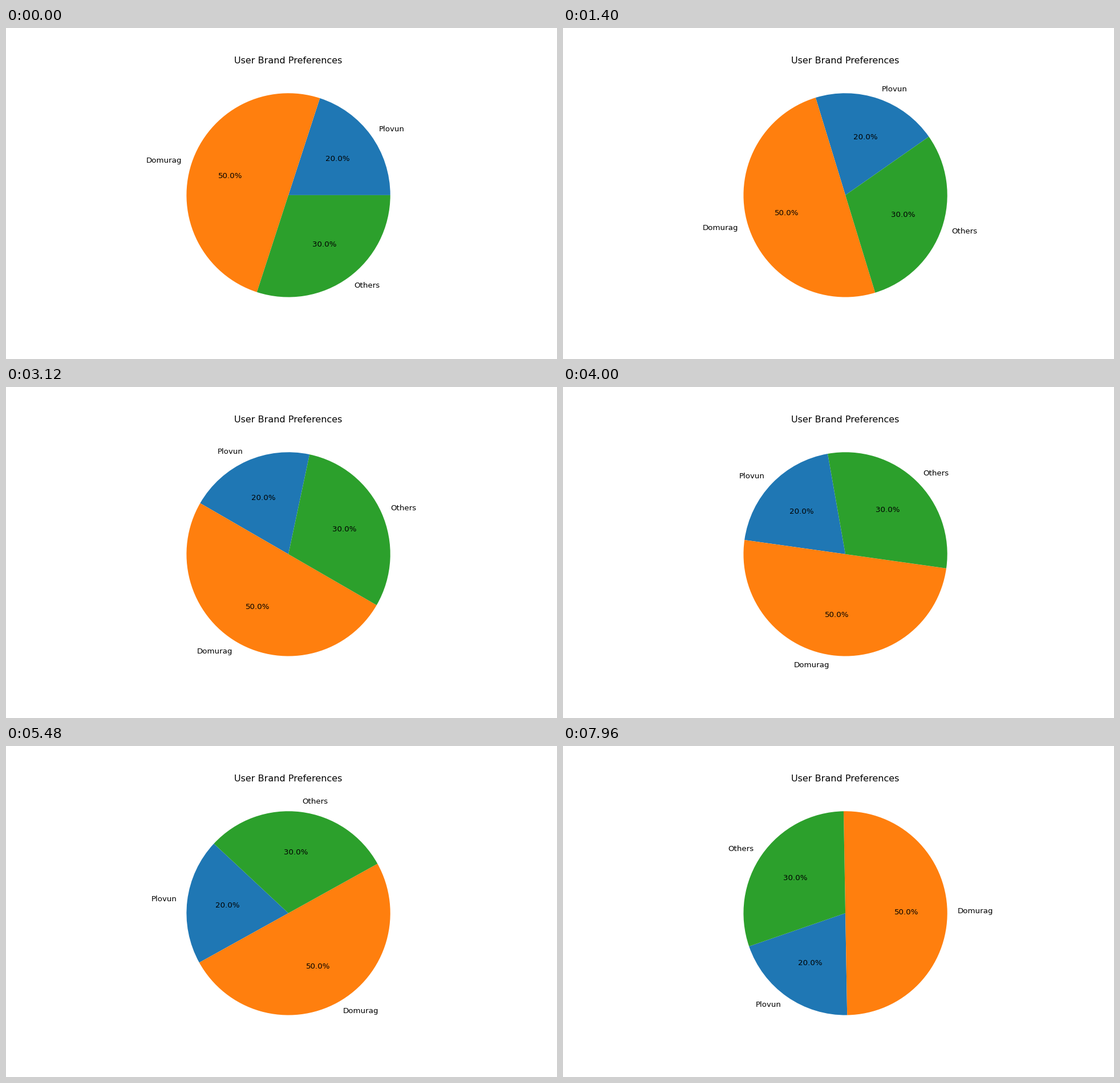
Recreate the animation shown at these times as a matplotlib script. Size 966 px wide and 580 px high, loop 8 s.

```python
import matplotlib.pyplot as plt
from matplotlib.animation import FuncAnimation

WIDTH, HEIGHT, DPI = 966, 580, 96
FRAMES, INTERVAL = 200, 40

LABELS = ["Plovun", "Domurag", "Others"]
SHARES = [20, 50, 30]
COLORS = ["#1f77b4", "#ff7f0e", "#2ca02c"]

plt.rcParams["font.family"] = "DejaVu Sans"
fig, ax = plt.subplots(figsize=(WIDTH / DPI, HEIGHT / DPI), dpi=DPI)


def draw(frame):
    """Draw the pie turned counterclockwise by one degree per frame."""
    ax.clear()
    wedges, labels, percents = ax.pie(
        SHARES, labels=LABELS, colors=COLORS, autopct="%1.1f%%", startangle=frame
    )
    ax.set_title("User Brand Preferences")
    return [*wedges, *labels, *percents]


anim = FuncAnimation(
    fig, draw, frames=FRAMES, interval=INTERVAL,
    init_func=lambda: draw(0), repeat=True, repeat_delay=0,
)
plt.show()
```
